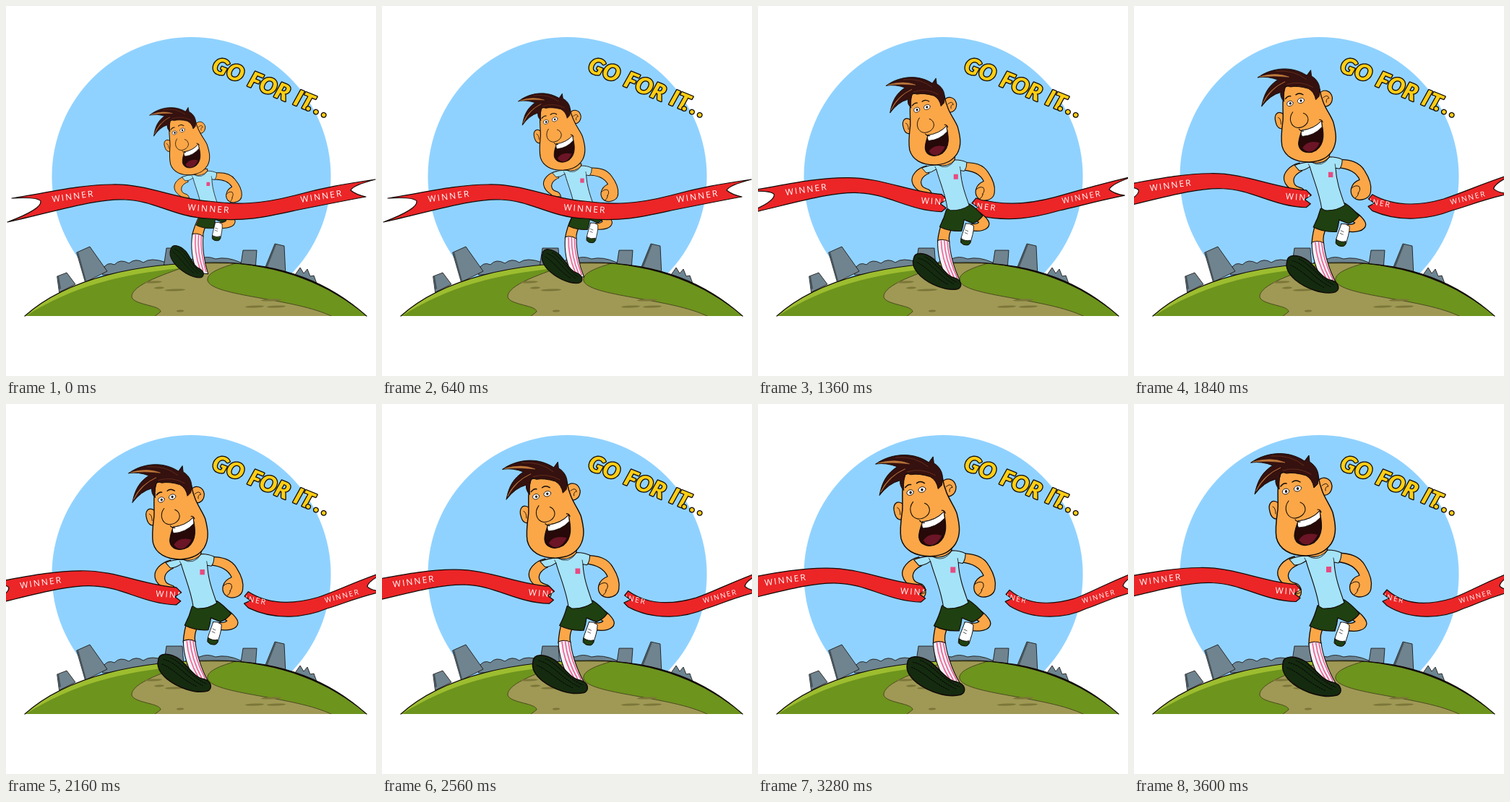
Write an HTML page with a canvas that moves like this. It is 512 by 512 pixels and loops after 3680 ms.

```html
<!DOCTYPE html>
<html lang="en">
<head>
<meta charset="utf-8">
<title>Finish line</title>
<style>
  html, body { margin: 0; width: 100%; height: 100%; overflow: hidden; background: #fff; }
  canvas { display: block; }
</style>
</head>
<body>
<canvas id="stage" width="512" height="512"></canvas>
<script>
const ctx = document.getElementById('stage').getContext('2d');
const LOOP = 3680, STEP = 80;
const INK = '#120b08', SKIN = '#fba748', GREEN = '#1f4010', RED = '#ec2527';

const lerp = (a, b, p) => a + (b - a) * p;
const mix = (a, b, p) => a.map((v, i) => lerp(v, b[i], p));

// Piecewise linear curve through [time, value] pairs
function track(t, keys) {
  const i = keys.findIndex(k => k[0] > t);
  if (i < 0) return keys[keys.length - 1][1];
  if (i === 0) return keys[0][1];
  const [t0, v0] = keys[i - 1], [t1, v1] = keys[i];
  return lerp(v0, v1, (t - t0) / (t1 - t0));
}

// Interpolates the numbers of two path strings of the same structure
function morph(a, b, p) {
  const nums = b.match(/-?[\d.]+/g);
  let i = 0;
  return a.replace(/-?[\d.]+/g, n => lerp(+n, +nums[i++], p));
}

function shape(d, fill, width = 1.3, stroke = INK) {
  const path = new Path2D(d);
  if (fill) { ctx.fillStyle = fill; ctx.fill(path); }
  if (width) { ctx.lineWidth = width; ctx.strokeStyle = stroke; ctx.stroke(path); }
}

function oval(x, y, rx, ry, fill, width = 0, turn = 0) {
  ctx.beginPath();
  ctx.ellipse(x, y, rx, ry, turn, 0, 7);
  ctx.fillStyle = fill;
  ctx.fill();
  if (width) { ctx.lineWidth = width; ctx.strokeStyle = INK; ctx.stroke(); }
}

// ---- Scenery ----

function cheer(text, x, spacing) {
  ctx.letterSpacing = spacing;
  ctx.strokeText(text, x, 0);
  ctx.fillText(text, x, 0);
}

function scenery() {
  ctx.fillStyle = '#fff';
  ctx.fillRect(0, 0, 512, 512);
  oval(256.5, 236, 193, 193, '#90d2ff');

  const bush = '#6d8592', wall = '#70848f', side = '#46545c';
  shape('M134 364 Q140 353 150 358 Q158 349 170 356 Q180 348 190 355 Q200 347 222 355 V372 H134Z', bush, .8);
  shape('M246 358 Q256 347 268 350 Q278 345 290 350 Q305 346 325 355 V365 H246Z', bush, .8);
  shape('M400 372 L407 362 L412 370 L417 364 L421 374 L426 373 L430 384 L404 386Z', bush, .8);
  shape('M98 341 L116 333 L140 367 L110 382Z', wall, .8);
  shape('M98 341 L100 340 L111 380 L109 381Z', side, 0);
  shape('M71 374 L84 369 L96 385 L74 396Z', wall, .8);
  shape('M71 374 L73 373 L76 391 L73 393Z', side, 0);
  shape('M218 362 L222 335 L244 335 L246 362Z', wall, .8);
  shape('M324 364 L328 338 L347 338 L345 366Z', wall, .8);
  shape('M357 366 L372 329 L385 332 L387 374Z', wall, .8);
  shape('M357 366 L372 329 L374 330 L360 366Z', side, 0);

  const crest = 'M26 429 C85 376 185 355 290 355 C385 355 450 385 499 429';
  ctx.save();
  ctx.clip(new Path2D(crest));
  shape(crest, '#9dbd2f', 0);
  shape('M26 430 C90 388 160 371 240 363 L290 355 C385 355 450 385 499 429 V430Z', '#6d941d', 0);
  shape('M262 356 C222 370 172 386 174 403 C178 414 214 414 214 423 L205 430 H452 C400 404 285 402 279 380 C277 369 298 362 318 356Z', '#9f9955', 1, '#4d4a20');
  for (const [x, y, r] of [[204, 382, 12], [234, 393, 14], [212, 390, 7], [241, 422, 5], [367, 407, 14], [344, 416, 13], [374, 416, 13]])
    oval(x, y, r, 1.5, '#7b7638', 0, -.04);
  ctx.restore();
  shape(crest, null, 1.2);
  shape('M290 355 C385 355 450 385 499 429 C448 387 385 358 290 355Z', INK, 0);

  ctx.save();
  ctx.translate(283, 90);
  ctx.rotate(.385);
  ctx.font = 'italic 900 31px Lato, sans-serif';
  ctx.textAlign = 'left';
  ctx.textBaseline = 'alphabetic';
  ctx.lineWidth = 2.6;
  ctx.strokeStyle = INK;
  ctx.fillStyle = '#ffce14';
  ctx.wordSpacing = '3px';
  cheer('GO FOR IT', 0, '0px');
  cheer('...', 142, '4px');
  ctx.restore();
}

// ---- Ribbon ----

const LEFT_TOP = 'M8 266 C50 260 100 247 147 247 C195 246 235 267 280 270';
const LEFT_BOTTOM = 'C235 293 205 269 165 268 C125 266 70 284 2 299 Q50 281 48 270 Q44 264 8 266Z';
const RIGHT_EDGE = 'C318 275 350 275 400 262 C440 251 470 246 511 240 Q480 248 477 255 Q484 261 498 264 C460 271 430 277 400 283 C360 292 330 299 280 294';
const LEFT_HALF = LEFT_TOP + ' L287 277 L278 283 L286 289 L280 294 ' + LEFT_BOTTOM;
const RIGHT_TEAR = ' L275 288 L283 283 L274 277Z';
const RIGHT_HALF = 'M280 270 ' + RIGHT_EDGE + RIGHT_TEAR;
const RIGHT_FAR = 'M350 257 C370 275 400 281 440 269 C465 260 485 246 541 225 Q506 243 506 252 Q512 258 528 258 C490 267 475 277 456 283 C430 296 385 301 350 279 L344 273 L353 269 L345 263Z';

// Labels are [x, y, degrees, scale]
const LABELS = [[92, 264, -8, 1], [280, 281, 4, 1], [436, 264, -9, 1]];
const RIGHT_LABELS = [[349, 267, 13, .84], [472, 267, -16, .8]];

function ribbon(d, labels) {
  shape(d, RED, 1.2);
  ctx.save();
  ctx.clip(new Path2D(d));
  ctx.font = '12px "Open Sans", sans-serif';
  ctx.textAlign = 'center';
  ctx.textBaseline = 'middle';
  ctx.letterSpacing = '2.1px';
  ctx.fillStyle = '#fff';
  for (const [x, y, deg, size] of labels) {
    ctx.save();
    ctx.translate(x, y);
    ctx.rotate(deg * Math.PI / 180);
    ctx.scale(size, size);
    ctx.fillText('WINNER', 1, .5);
    ctx.restore();
  }
  ctx.restore();
}

function tornRibbon(left, right) {
  ctx.save();
  ctx.translate(-56 * left, -20.5 * left);
  ribbon(LEFT_HALF, LABELS.slice(0, 2));
  ctx.restore();
  ribbon(morph(RIGHT_HALF, RIGHT_FAR, right),
    RIGHT_LABELS.map((far, i) => mix(LABELS[i + 1], far, right)));
}

// ---- Runner: drawn in the near pose, each part carried by two anchors ----

function part(p, [ax, ay, bx, by], start, draw) {
  const [x, y, ex, ey] = mix(start, [ax, ay, bx, by], p);
  const dx = bx - ax, dy = by - ay, len = dx * dx + dy * dy;
  const c = (dx * (ex - x) + dy * (ey - y)) / len;
  const s = (dx * (ey - y) - dy * (ex - x)) / len;
  ctx.save();
  ctx.transform(c, s, -s, c, x - c * ax + s * ay, y - s * ax - c * ay);
  draw();
  ctx.restore();
}

function leftArm(p) {
  part(p, [217, 217, 199, 236], [246, 239, 233, 251], () => {
    shape('M222 211 C206 215 197 227 199 237 C201 246 208 250 214 254 C216 264 222 268 229 267 C233 262 232 253 226 249 C221 247 217 247 215 243 C211 236 215 228 226 223Z', SKIN);
    shape('M222 257 Q226 259 229 256 M222 262 Q226 264 230 261', null, 1);
  });
}

function legs(p) {
  part(p, [322, 303, 284, 334], [317, 297, 291, 324], () => {
    shape('M303 283 C312 287 322 298 322 304 C321 314 306 316 293 313 L290 303 C298 304 304 303 306 301 L296 295Z', SKIN);
    shape('M286 302 Q292 301 298 306 C298 316 294 324 292 332 Q285 338 277 331 C277 323 282 314 286 302Z', '#fff', 1);
    shape('M278 325 Q285 330 292 328 Q292 337 284 335 Q276 334 278 325Z', GREEN, 1);
    shape('M285 312 L289 314 M284 316 L288 318', null, .7);
  });
  part(p, [250, 331, 267, 382], [265, 317, 270, 365], () => {
    shape('M247 300 C243 314 242 324 242 333 L259 332 C257 324 258 318 263 306Z', SKIN);
    shape('M242 331 Q250 327 259 331 C261 346 268 368 279 386 L262 388 C250 370 243 350 242 331Z', '#f4f1f8', 1.1);
    shape('M247 331 Q250 357 265 381 M251.5 330 Q255 357 270 382 M256 331 Q260 357 275 383', null, 1.6, '#ef5d8f');
  });
  part(p, [206, 355, 288, 398], [229, 333, 274, 374], () => {
    shape('M206 360 C206 348 222 347 238 357 C252 368 262 384 275 385 C288 388 289 400 281 403 C262 408 236 399 220 387 C210 379 204 369 206 360Z', '#152b10', 1.6);
    ctx.setLineDash([1.5, 2]);
    shape('M214 358 C235 362 246 382 274 395 M212 365 C230 372 242 387 266 397 M224 355 C242 362 254 381 279 392', null, 1.3, '#070d06');
    ctx.setLineDash([]);
  });
}

function body(p) {
  part(p, [244, 308, 311, 290], [264, 304, 309, 291], () =>
    shape('M254 279 L291 271 C299 276 306 283 312 290 Q305 299 296 302 L282 296 Q281 305 278 314 Q258 315 243 307 Q250 294 254 279Z', GREEN));
  part(p, [286, 212, 313, 252], [291, 235, 315, 261], () => {
    shape('M278 206 C300 206 313 211 320 224 C326 234 330 245 328 255 C327 263 320 267 311 267 C303 266 297 260 299 250 C301 243 306 239 312 237 C308 227 298 220 280 218Z', SKIN);
    shape('M300 249 Q306 244 311 247 Q314 252 309 257 M305 264 Q309 261 310 257', null, 1);
  });
  part(p, [216, 217, 286, 206], [244, 238, 291, 231], () => {
    shape('M238 198 H268 L266 210 L252 216 L240 212Z', SKIN);
    shape('M240 210 Q257 215 268 202 C275 202 281 203 287 206 Q287 215 283 220 L277 219 C278 240 285 258 291 275 Q278 284 261 283 L256 280 C253 258 244 238 238 217 Q230 223 222 223 L215 215 Q227 210 240 210Z', '#a5e3f9', 1.1);
    shape('M240 210 Q257 220 268 202 M238 217 L236 213 M277 219 L276 213', null, .8);
    ctx.fillStyle = '#e84a80';
    ctx.fillRect(266, 225, 7, 8);
  });
}

function head(p) {
  part(p, [193, 146, 264, 114], [223, 193, 269, 168], () => {
    shape('M200 137 C190 130 185 139 188 149 C190 158 196 162 202 156Z', SKIN);
    shape('M253 108 C261 98 272 102 274 113 C274 122 268 128 260 126Z', SKIN);
    shape('M192 142 Q196 143 196 152 M260 113 Q267 107 269 114 Q264 114 265 120', null, .9);
    shape('M203 96 C197 112 200 130 199 146 C197 160 195 172 197 185 C201 201 216 210 238 210 C257 209 266 203 273 193 C281 180 279 166 275 150 C270 136 259 126 255 100 Q230 84 203 96Z', SKIN, 1.5);

    shape('M162 81 C180 68 211 62 236 79 L242 71 L243 80 C253 86 258 97 254 111 L249 116 Q247 104 238 99 Q222 94 211 96 L204 94 Q200 101 201 118 Q195 112 196 104 Q180 108 167 125 C171 105 178 94 192 85 Q177 79 162 81Z', '#35110f', 1);
    shape('M169 120 Q178 99 203 88 Q183 96 169 120Z M165 80 Q190 73 209 81 Q186 78 165 80Z', '#c07a3c', .6, '#c07a3c');
    shape('M190 72 Q217 70 235 85 M206 92 Q226 86 245 97', null, .8, '#6f351f');

    oval(210, 121, 4.8, 3.8, '#fff', .9, -.3);
    oval(226.5, 117, 5.2, 3.8, '#fff', .9, -.3);
    oval(210.5, 121, 1.7, 1.9, INK);
    oval(226.5, 117, 1.7, 1.9, INK);
    shape('M203 114 Q207 109 211 110 M219 108 Q224 104 230 108', null, 1.5);
    shape('M214 134 C207 143 210 156 221 158 C229 158 237 153 237 145 Q236 138 230 136', null, 1.1);

    shape('M227 162 Q246 160 257 148 C260 164 263 181 249 192 C237 199 223 195 222 183 C222 175 225 169 227 162Z', '#260908', 1.2);
    shape('M228 188 Q236 176 254 181 Q250 190 242 194 Q233 196 228 188Z', '#6b1526', 0);
    shape('M227 162 Q246 160 257 148 L258 157 Q246 170 228 171 Q225 168 227 162Z', '#fff', .9);
    shape('M223 160 Q226 164 230 163 M254 146 Q258 146 259 150', null, 1.2);
  });
}

function render(t) {
  const late = [[1680, .72], [1840, .745], [2160, .79], [2960, .945], [3600, 1]];
  const p = track(t, [[0, 0], ...late]);
  const torn = t > 1120;
  scenery();
  leftArm(p);
  if (torn) tornRibbon(
    track(t, [[1120, 0], [1360, .46], ...late]),
    track(t, [[1120, 0], [1360, .31], [1680, .66], [1840, .71], ...late.slice(2)]));
  legs(p);
  body(p);
  head(p);
  if (!torn) ribbon(LEFT_TOP + RIGHT_EDGE + LEFT_BOTTOM, LABELS);
}

ctx.lineJoin = ctx.lineCap = 'round';
function tick() {
  render(Math.floor(performance.now() % LOOP / STEP) * STEP);
  requestAnimationFrame(tick);
}
tick();
</script>
</body>
</html>
```
